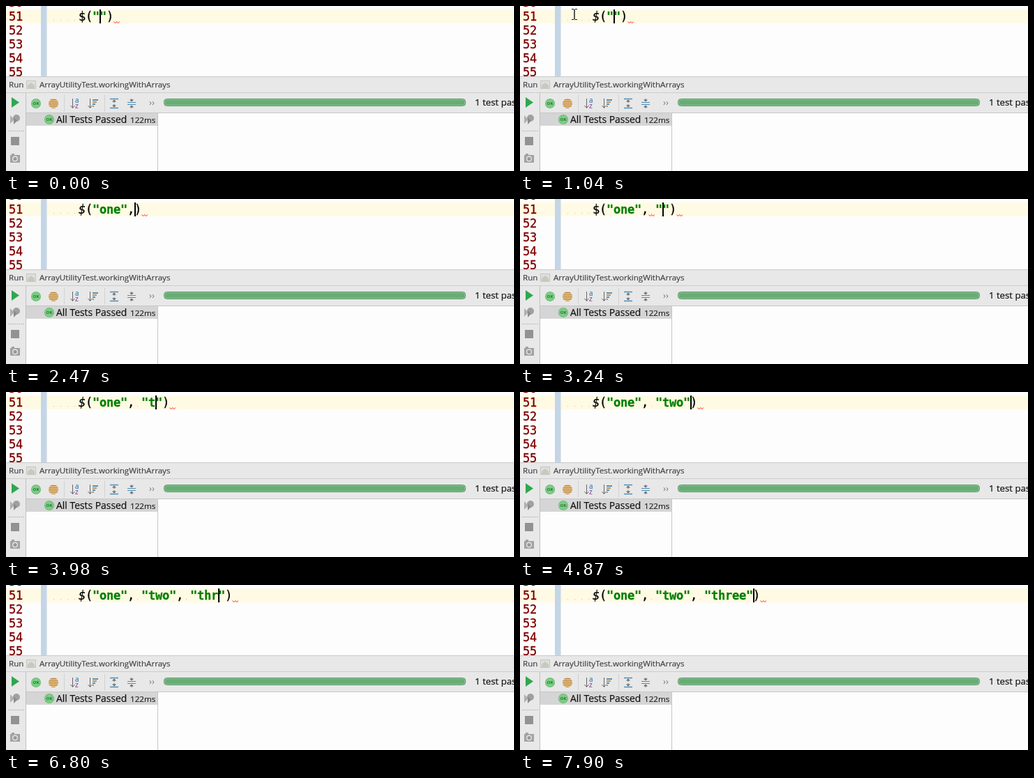
An HTML page with a canvas that plays this animation: 728 by 237 pixels, repeating every 8000 ms.

```html
<!DOCTYPE html>
<html lang="en">
<head>
<meta charset="utf-8">
<title>Typing a call in the editor</title>
<style>
html, body { margin: 0; width: 728px; height: 237px; overflow: hidden; }
canvas { display: block; }
</style>
</head>
<body>
<canvas id="stage" width="728" height="237"></canvas>
<script>
const g = document.getElementById('stage').getContext('2d');
const LOOP = 8000, COL = 10, LEFT = 104, BASE = 21;
const MONO = '"DejaVu Sans Mono", "Liberation Mono", monospace';
const SANS = '"Open Sans", "Noto Sans", sans-serif';
const SMALL = `11.6px ${SANS}`, NORMAL = `13.9px ${SANS}`;

// [start ms, arguments, caret column, changed flags]; flags persist until changed
const steps = [
  [0, '""', 3, { italic: false, match: false, gap: 0, mouse: false }],
  [440, '""', 3, { italic: true }],
  [1040, '""', 3, { mouse: true }],
  [1190, '"o"', 4, { mouse: false }],
  [1490, '"one"', 6],
  [2000, '"one"', 7],
  [2470, '"one",', 8],
  [2620, '"one", ', 9, { match: true }],
  [2920, '"one", ', 9, { italic: false, gap: 8 }],
  [3240, '"one", ""', 10, { match: false }],
  [3690, '"one", ""', 10, { italic: true, gap: 0 }],
  [3980, '"one", "t"', 11],
  [4130, '"one", "tw"', 12],
  [4270, '"one", "two"', 13],
  [4870, '"one", "two"', 14],
  [5460, '"one", "two", ', 16],
  [5610, '"one", "two", ', 16, { match: true, gap: 15 }],
  [6060, '"one", "two", ""', 17, { match: false }],
  [6360, '"one", "two", ""', 17, { gap: 0 }],
  [6650, '"one", "two", "t"', 18],
  [6800, '"one", "two", "thr"', 20],
  [7100, '"one", "two", "thre"', 21],
  [7240, '"one", "two", "three"', 22],
  [7900, '"one", "two", "three"', 23]
];

function rect(x, y, w, h, color) {
  g.fillStyle = color;
  g.fillRect(x, y, w, h);
}

// weight adds a hairline outline for denser letters
function text(str, x, y, font, color = '#111', weight = 0.2) {
  g.font = font;
  g.fillStyle = g.strokeStyle = color;
  g.lineWidth = weight;
  g.fillText(str, x, y);
  if (weight) g.strokeText(str, x, y);
}

function line(points, color, width = 1, dash = []) {
  g.beginPath();
  points.forEach(([x, y]) => g.lineTo(x, y));
  g.strokeStyle = color;
  g.lineWidth = width;
  g.setLineDash(dash);
  g.stroke();
  g.setLineDash([]);
}

function shape(points, color) {
  g.beginPath();
  points.forEach(([x, y]) => g.lineTo(x, y));
  g.fillStyle = color;
  g.fill();
}

function disc(x, y, r, color) {
  g.beginPath();
  g.arc(x, y, r, 0, 7);
  g.fillStyle = color;
  g.fill();
}

function mono(str, x, y, color, style = '') {
  [...str].forEach((c, i) => text(c, x + i * COL, y, `${style} 17px ${MONO}`, color, 0.3));
}

const colX = col => LEFT + col * COL;

function squiggle(x) {
  const points = [];
  for (let i = 0; i <= 4; i++) points.push([x + 0.5 + i * 2.1, i % 2 ? 24.5 : 22.5]);
  line(points, '#f22');
}

function ibeam(x, y) {
  for (const d of [-1, 1]) {
    line([[x + 4 * d, y + 0.5], [x + d, y + 0.5], [x, y + 2], [x, y + 14], [x + d, y + 15.5], [x + 4 * d, y + 15.5]], '#222');
  }
}

function stateAt(t) {
  const state = {};
  for (const [start, args, caret, flags] of steps) {
    if (start > t) break;
    Object.assign(state, { args, caret }, flags);
  }
  return state;
}

function drawCode({ args, caret, italic, match, gap, mouse }) {
  const code = `$(${args})`, close = code.length - 1;
  if (match) [1, close].forEach(c => rect(colX(c), 5, COL, 20, '#99ccff'));
  for (let c = -4; c < 0; c++) rect(colX(c) + 4, 20, 1, 1, '#c4c4bc');
  let quoted = false;
  [...code].forEach((c, i) => {
    const inString = quoted || c === '"';
    if (c === '"') quoted = !quoted;
    if (c === ' ') rect(colX(i) + 4, 20, 1, 1, '#c4c4bc');
    else if (inString) mono(c, colX(i), BASE, '#008000', 'bold');
    else mono(c, colX(i), BASE, '#000', c === '$' && italic ? 'italic' : '');
  });
  squiggle(colX(code.length));
  if (gap) squiggle(colX(gap));
  rect(colX(caret), 5, 2, 20, '#000');
  if (mouse) ibeam(78, 4);
}

function drawEditor(state) {
  rect(0, 0, 728, 103, '#fdfdfd');
  rect(0, 5, 728, 20, '#fffae3');
  rect(50, 0, 8, 102, '#c3d6e8');
  rect(58, 0, 1, 102, '#e6e6e6');
  for (let i = 0; i < 6; i++) mono(String(50 + i), 4, 1 + i * 20, '#800000');
  drawCode(state);
}

function okBadge(x, y) {
  disc(x, y, 7, '#68b872');
  disc(x, y, 6.2, '#7bcd84');
  g.textAlign = 'center';
  text('OK', x, y + 2.2, `bold 6px ${SANS}`, '#2f7038', 0);
  g.textAlign = 'left';
}

function downArrow(x) {
  line([[x + 0.5, 133], [x + 0.5, 146]], '#666');
  line([[x - 2.5, 143], [x + 0.5, 146.5], [x + 3.5, 143]], '#666');
}

function foldIcon(x, expand) {
  const ys = expand ? [133.5, 146.5] : [138.5, 141.5];
  ys.forEach(y => line([[x - 6, y], [x + 6, y]], '#4f8db8', expand ? 1.5 : 1));
  for (const d of [-1, 1]) {
    const tip = 140 + d * (expand ? 5.5 : 2.5);
    const base = 140 + d * (expand ? 2.5 : 5.5);
    const tail = 140 + d * (expand ? 1 : 7);
    shape([[x - 3, base], [x + 3, base], [x, tip]], '#666');
    line([[x, base], [x, tail]], '#666');
  }
}

function drawSidebar() {
  shape([[8, 131], [19, 138.5], [8, 146]], '#2fa84f');
  disc(15, 161, 5, '#a0a0a0');
  shape([[6, 157], [12, 163], [6, 169]], '#b0b0b0');
  shape([[11, 160], [16, 165], [11, 170]], '#8c8c8c');
  line([[3, 179.5], [27, 179.5]], '#b8b8b8', 1, [2, 1]);
  rect(7, 188, 12, 12, '#929292');
  rect(6, 214, 14, 11, '#a2a2a2');
  rect(8, 212, 4, 2, '#a2a2a2');
  disc(13, 219.5, 4, '#e4e4e4');
  disc(13, 219.5, 2.6, '#999');
}

function drawToolbar() {
  okBadge(43, 140);
  g.save();
  g.beginPath();
  g.arc(68, 140, 7, 0, 7);
  g.clip();
  rect(61, 133, 14, 14, '#edc98f');
  for (let y = 134; y < 147; y += 3) rect(61, y, 14, 1.5, '#b98a48');
  g.restore();
  [83.5, 141.5].forEach(x => line([[x, 128], [x, 152]], '#bbb', 1, [1, 1]));

  downArrow(95);
  text('a', 99, 139, `10px ${SANS}`, '#3d7fb0');
  text('z', 99, 147, `10px ${SANS}`, '#8a4a9a');
  downArrow(120);
  [8, 6, 4, 2].forEach((w, i) => rect(124, 134 + i * 3, w, 2, i % 2 ? '#b9975c' : '#5b90b4'));
  foldIcon(155, true);
  foldIcon(180, false);
  text('››', 205, 143, `13px ${SANS}`, '#777', 0);

  g.beginPath();
  g.roundRect(226.5, 133.5, 432, 10, 4);
  g.fillStyle = '#b4d8ba';
  g.fill();
  g.strokeStyle = '#5b9467';
  g.lineWidth = 1;
  g.stroke();
  g.beginPath();
  g.roundRect(227.5, 134.5, 430, 8, 3);
  g.fillStyle = '#66ae74';
  g.fill();
  text('1 test passed', 672, 143, `13.2px ${SANS}`);
}

function drawPanel() {
  rect(0, 101, 728, 136, '#e8e8e8');
  rect(0, 101, 728, 1, '#c9c9c9');
  rect(0, 124, 728, 1, '#cdcdcd');
  text('Run', 4, 117, SMALL, '#444');
  rect(29, 107, 14, 12, '#c6c6c3');
  rect(30, 108, 12, 10, '#dedfdb');
  shape([[31, 118], [31, 114], [36, 110], [41, 114], [41, 118]], '#c3cbbf');
  text('ArrayUtilityTest.workingWithArrays', 48, 117, SMALL, '#444');

  rect(28, 125, 1, 112, '#c0c0c0');
  rect(29, 153, 699, 1, '#c6c6c6');
  rect(29, 154, 699, 83, '#fdfdfd');
  rect(29, 154, 188, 18, '#d5d5d5');
  rect(217, 154, 1, 83, '#c6c6c6');
  okBadge(62, 163);
  text('All Tests Passed', 72, 168, NORMAL);
  text('122ms', 178, 168, SMALL, '#222');
  drawSidebar();
  drawToolbar();
}

function frame() {
  drawEditor(stateAt(performance.now() % LOOP));
  drawPanel();
  requestAnimationFrame(frame);
}
frame();
</script>
</body>
</html>
```
